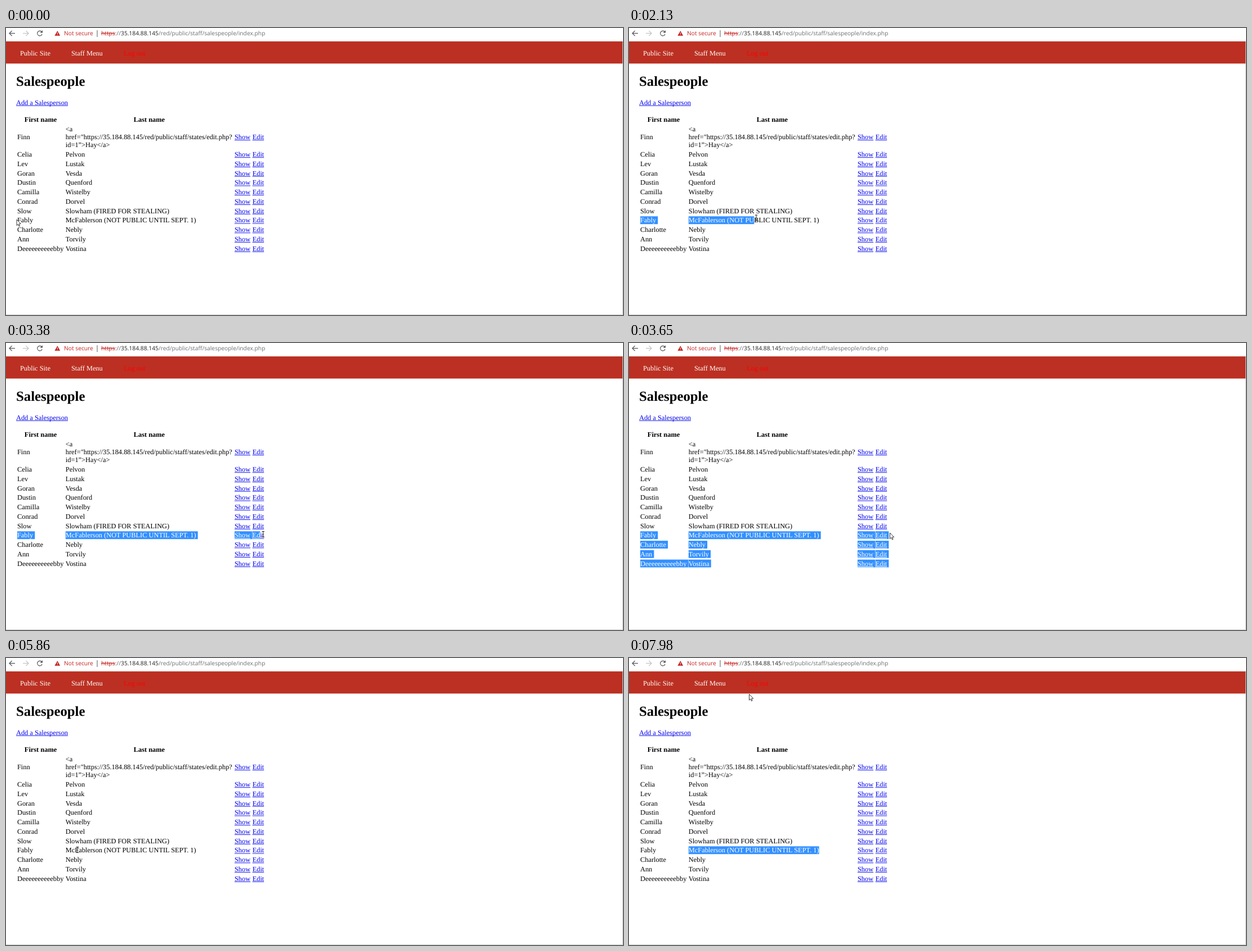
An HTML page with a canvas for the animation above (8000 ms loop, 1096 by 511 pixels).

```html
<!DOCTYPE html>
<html lang="en">
<head>
<meta charset="utf-8">
<title>Salespeople</title>
<style>
  html, body { margin: 0; width: 100%; height: 100%; overflow: hidden; background: #fff; }
  canvas { display: block; width: 1096px; height: 511px; }
</style>
</head>
<body>
<canvas id="stage" width="1096" height="511"></canvas>
<script>
const ctx = document.getElementById('stage').getContext('2d');
ctx.textRendering = 'geometricPrecision';

const LOOP = 8000;
const SERIF = '"Liberation Serif", "Times New Roman", serif';
const BODY = `12.37px ${SERIF}`;
const BOLD = `bold 12.37px ${SERIF}`;
const TITLE = `bold 24.75px ${SERIF}`;
const BAR = '10.28px "Open Sans", "Noto Sans", sans-serif';
const LINK = '#0000ee';
const HIGHLIGHT = '#3390ff';
const COLS = [20, 105.8, 406, 437.7];
const FIRST_ROW = 229.1, PITCH = 16.77;
const TARGET = 7;

const people = [
  ['Celia', 'Pelvon'], ['Lev', 'Lustak'], ['Goran', 'Vesda'],
  ['Dustin', 'Quenford'], ['Camilla', 'Wistelby'], ['Conrad', 'Dorvel'],
  ['Slow', 'Slowham (FIRED FOR STEALING)'],
  ['Fably', 'McFablerson (NOT PUBLIC UNTIL SEPT. 1)'],
  ['Charlotte', 'Nebly'], ['Ann', 'Torvily'], ['Deeeeeeeeeebby', 'Vostina']
];

// Bursts of pointer updates: first time, last time, number of updates
const bursts = [
  [0, 0, 1], [400, 400, 1], [830, 1240, 3], [1700, 2710, 8], [2860, 3650, 7],
  [3950, 4070, 2], [4350, 4350, 1], [4910, 5320, 4], [5600, 5860, 3],
  [6140, 6280, 2], [6710, 6990, 3], [7420, 7980, 5]
];
const ticks = bursts.flatMap(([from, to, n]) => Array.from({ length: n }, (_, i) =>
  Math.floor((from + (to - from) * i / Math.max(1, n - 1)) / 10) * 10));

// Pointer path: time, x, y
const path = [
  [0, 18.5, 340.5], [400, 22, 346.5], [1240, 22.5, 341.5], [1700, 54.5, 349],
  [1840, 88, 353.5], [2130, 226, 338], [2710, 456, 340], [2860, 464, 328],
  [3120, 465, 319], [3250, 457, 338], [3380, 456.8, 340.5], [3520, 457, 340],
  [3650, 463, 337.5], [3950, 466, 338], [4070, 464, 338], [4350, 457.6, 338.5],
  [4910, 456, 338], [5320, 234, 329.5], [5600, 205, 331], [5860, 127, 341.5],
  [6280, 127, 341.5], [6710, 135, 270], [6990, 178, 158], [7420, 170, 138],
  [7700, 194, 92], [7980, 213, 64]
];

function pointerAt(t) {
  const i = path.findIndex(p => p[0] > t);
  if (i < 0) return path[path.length - 1].slice(1);
  const [a, b] = [path[i - 1], path[i]];
  const k = (t - a[0]) / (b[0] - a[0]);
  return [a[1] + (b[1] - a[1]) * k, a[2] + (b[2] - a[2]) * k];
}

function width(str, font = BODY) {
  ctx.font = font;
  return ctx.measureText(str).width;
}

function text(str, x, y, color = '#000', font = BODY) {
  ctx.font = font;
  ctx.fillStyle = color;
  ctx.fillText(str, x, y);
}

function rect(x, y, w, h, color) {
  ctx.fillStyle = color;
  ctx.fillRect(x, y, w, h);
}

function link(str, x, y, color = LINK) {
  text(str, x, y, color);
  rect(x, y + 1.1, width(str), 0.9, color);
}

function shape(points, fill, stroke, line = 1.2, close = true) {
  ctx.beginPath();
  points.forEach(([x, y]) => ctx.lineTo(x, y));
  if (close) ctx.closePath();
  ctx.lineWidth = line;
  if (fill) { ctx.fillStyle = fill; ctx.fill(); }
  if (stroke) { ctx.strokeStyle = stroke; ctx.stroke(); }
}

function barArrow(x, dir, color) {
  shape([[x, 9.5], [x + dir * 10, 9.5]], null, color, 1.3, false);
  shape([[x + dir * 4.6, 4.9], [x, 9.5], [x + dir * 4.6, 14.1]], null, color, 1.3, false);
}

function drawBar() {
  barArrow(6, 1, '#55585c');
  barArrow(40, -1, '#c3c5c7');
  ctx.beginPath();
  ctx.arc(60, 9.5, 4.3, 0.35, 5.5);
  ctx.lineWidth = 1.3;
  ctx.strokeStyle = '#55585c';
  ctx.stroke();
  shape([[65, 4], [65, 8.6], [60.4, 8.6]], '#55585c');
  shape([[91.3, 5], [96.2, 13.7], [86.4, 13.7]], '#c5221f');
  rect(90.8, 8, 1, 2.6, '#fff');
  rect(90.8, 11.4, 1, 1, '#fff');
  text('Not secure', 103, 13, '#c5221f', BAR);
  rect(161.5, 4, 1, 12, '#55585c');

  let x = 169;
  const parts = [['https', '#c5221f'], ['://', '#5f6368'], ['35.184.88.145', '#202124'],
    ['/red/public/staff/salespeople/index.php', '#6b6f73']];
  for (const [str, color] of parts) {
    text(str, x, 13, color, BAR);
    const w = width(str, BAR);
    if (str === 'https') rect(x, 9.1, w, 1, color);
    x += w;
  }
}

function drawHeader() {
  rect(0, 23, 1096, 1, '#e6dcda');
  rect(0, 24, 1096, 39.3, '#bb3022');
  text('Public Site', 25, 48.6, '#fff');
  text('Staff Menu', 116, 48.6, '#fff');
  text('Log out', 209, 48.6, '#ff0000');
  text('Salespeople', 18, 102.7, '#000', TITLE);
  link('Add a Salesperson', 18, 136.7);
  text('First name', 61.5 - width('First name', BOLD) / 2, 167, '#000', BOLD);
  text('Last name', 254.4 - width('Last name', BOLD) / 2, 167, '#000', BOLD);
}

const rowY = i => FIRST_ROW + PITCH * i;
const cells = i => [...people[i], 'Show', 'Edit'];

function drawRow(i, color) {
  cells(i).forEach((str, c) =>
    c < 2 ? text(str, COLS[c], rowY(i), color) : link(str, COLS[c], rowY(i), color));
}

function drawTable() {
  text('Finn', COLS[0], 198.1);
  ['<a', 'href="https://35.184.88.145/red/public/staff/states/edit.php?', 'id=1”>Hay</a>']
    .forEach((str, i) => text(str, COLS[1], 184.2 + 14 * i));
  link('Show', COLS[2], 198.1);
  link('Edit', COLS[3], 198.1);
  people.forEach((_, i) => drawRow(i));
}

function highlight(i, x, w) {
  const top = rowY(i) - 11.2;
  rect(x, top, w, 13.9, HIGHLIGHT);
  ctx.save();
  ctx.beginPath();
  ctx.rect(x, top, w, 13.9);
  ctx.clip();
  drawRow(i, '#fff');
  ctx.restore();
}

// Width of the leading characters that end nearest to the given distance
function snap(str, distance) {
  let best = 0;
  for (let n = 1; n <= str.length; n++) {
    const w = width(str.slice(0, n));
    if (Math.abs(w - distance) < Math.abs(best - distance)) best = w;
  }
  return best;
}

function dragSelect(x) {
  const end = x - 4;
  cells(TARGET).forEach((str, c) => {
    if (end <= COLS[c]) return;
    const full = width(str);
    const next = COLS[c + 1];
    const passed = next && end >= next;
    highlight(TARGET, COLS[c], passed ? full + 3.1 : snap(str, end - COLS[c]));
  });
}

function selectToEnd() {
  for (let i = TARGET; i < people.length; i++)
    cells(i).forEach((str, c) => highlight(i, COLS[c], width(str) + 3.1));
}

function drawSelection(t, x) {
  const name = people[TARGET][1];
  if (t >= 1700 && t < 4910) {
    if (x > 462) selectToEnd();
    else dragSelect(x);
  } else if (t >= 6140) {
    highlight(TARGET, COLS[1], width(t < 6280 ? name.split(' ')[0] : name));
  }
}

function drawBeam(x, y) {
  const stroke = (color, line) => {
    shape([[x, y - 4.8], [x, y + 4.8]], null, color, line, false);
    for (const end of [y - 5, y + 5])
      shape([[x - 2.3, end], [x + 2.3, end]], null, color, line, false);
  };
  stroke('#222', 1);
}

function drawArrow(x, y) {
  const outline = [[0, 0], [0, 10.6], [2.4, 8.4], [4, 12.1], [5.6, 11.4], [4, 7.8], [7.3, 7.6]];
  shape(outline.map(([dx, dy]) => [x + 0.5 + dx, y + 0.5 + dy]), '#fff', '#222', 0.9);
}

function drawPointer(x, y) {
  const overText = y > 280 &&
    [[20, 47], [105, 338], [406, 460]].some(([a, b]) => x >= a && x <= b);
  (overText ? drawBeam : drawArrow)(x, y);
}

function draw(now) {
  const time = now % LOOP;
  const t = ticks.filter(k => k <= time).pop();
  const [x, y] = pointerAt(t);
  rect(0, 0, 1096, 511, '#fff');
  drawBar();
  drawHeader();
  drawTable();
  rect(1095, 24, 1, 487, '#c8c8c8');
  rect(0, 510, 1096, 1, '#d0d0d0');
  drawSelection(t, x);
  drawPointer(x, y);
}

const start = performance.now();
function frame() {
  draw(performance.now() - start);
  requestAnimationFrame(frame);
}
frame();
</script>
</body>
</html>
```
